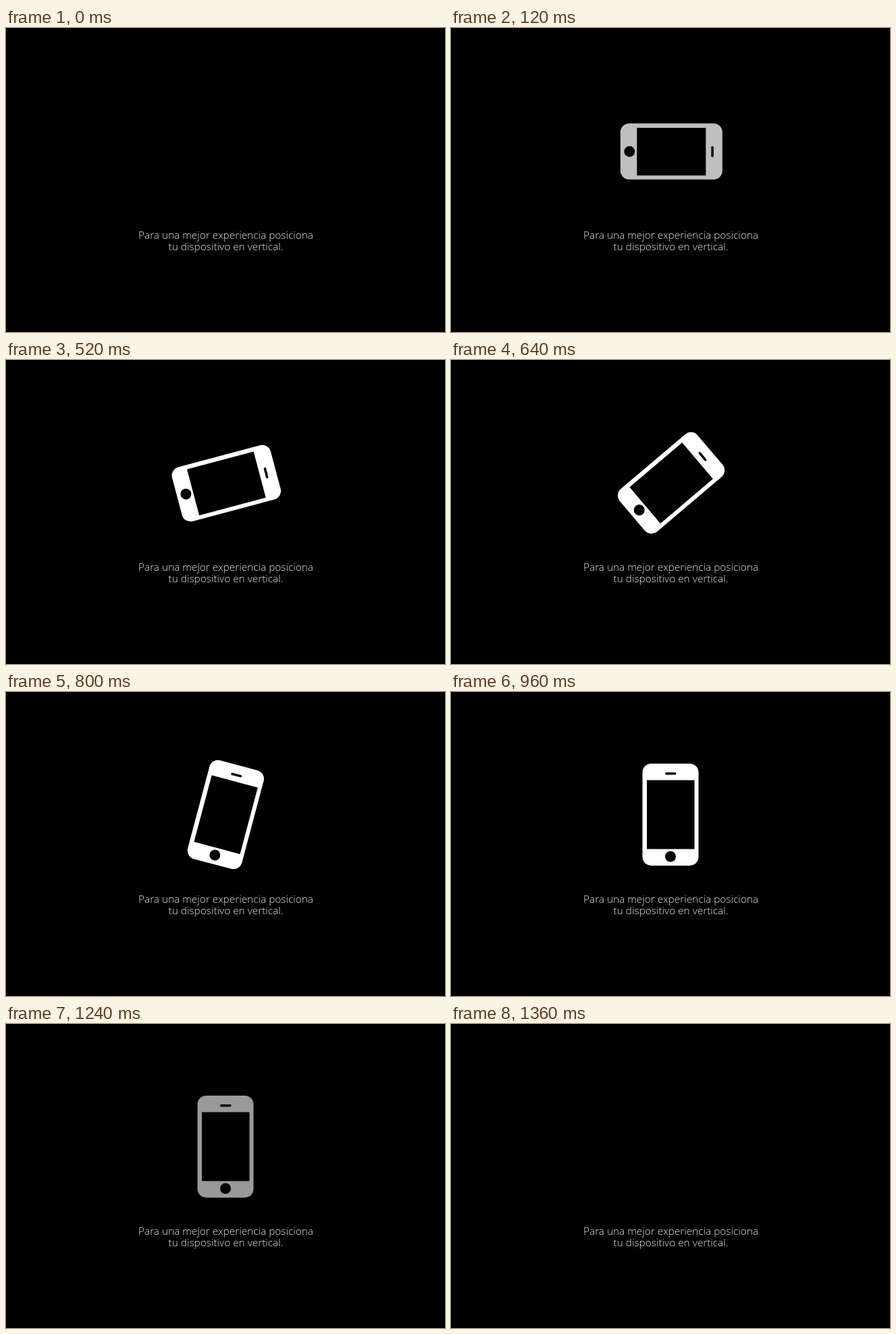
Recreate the animation shown at these times as an HTML page. Size 650 by 450 pixels, loop 1400 ms.

```html
<!DOCTYPE html>
<html lang="es">
<head>
<meta charset="utf-8">
<style>
  html, body { margin: 0; width: 100%; height: 100%; overflow: hidden; background: #000; }
  svg { display: block; }
  text { font: 300 15.4px "Open Sans", Lato, sans-serif; fill: #eee; text-anchor: middle; }
</style>
</head>
<body>
<svg width="650" height="450" viewBox="0 0 650 450">
  <g id="phone" opacity="0">
    <rect x="283.5" y="106" width="83" height="151" rx="13" fill="#fff"/>
    <rect x="290" y="130.5" width="70.5" height="102"/>
    <rect x="317" y="119" width="16.5" height="3.5" rx="1.7"/>
    <circle cx="325" cy="243.5" r="8"/>
  </g>
  <text x="325.5" y="312">Para una mejor experiencia posiciona</text>
  <text x="325.5" y="329">tu dispositivo en vertical.</text>
</svg>
<script>
const LOOP = 1400, STEP = 40;
const phone = document.getElementById('phone');
const progress = (t, from, to) => Math.min(1, Math.max(0, (t - from) / (to - from)));
const easeInOut = p => (1 - Math.cos(Math.PI * p)) / 2;

let start;
function draw(now) {
  start ??= now;
  const t = Math.floor((now - start) % LOOP / STEP) * STEP;
  const angle = 90 * (1 - easeInOut(progress(t, 360, 960)));
  phone.setAttribute('transform', `rotate(${angle} 325 182.8)`);
  phone.setAttribute('opacity', progress(t, 0, 160) - progress(t, 1160, 1360));
  requestAnimationFrame(draw);
}
requestAnimationFrame(draw);
</script>
</body>
</html>
```
